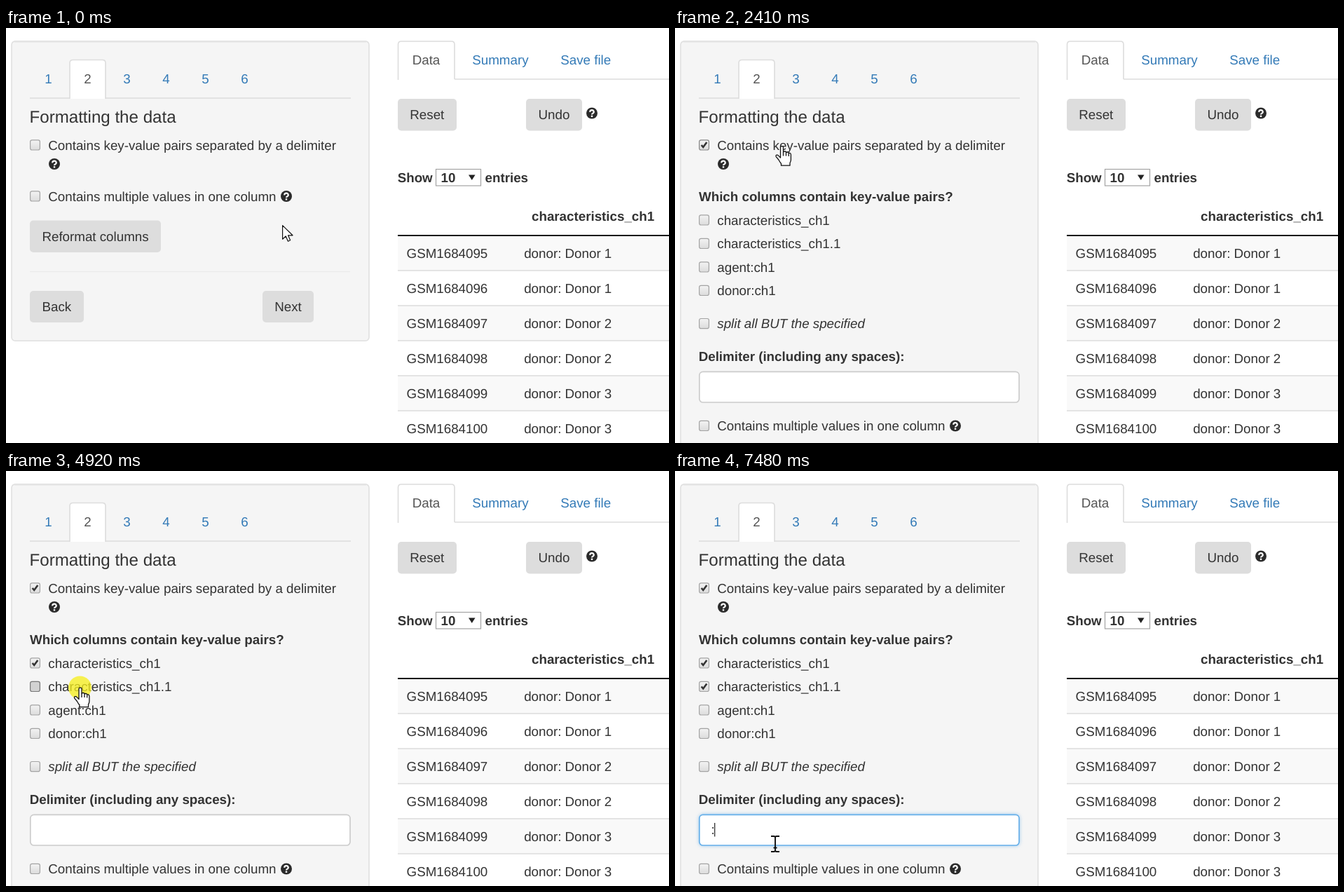
An HTML page that plays this animation: 946x592 px, repeating every 8 s.

```html
<!DOCTYPE html>
<html lang="en">
<head>
<meta charset="utf-8">
<title>Formatting the data</title>
<style>
html, body { margin: 0; width: 100%; height: 100%; overflow: hidden; background: #fff; }
svg { display: block; }
text {
  font: 18.76px "Liberation Sans", Arial, sans-serif;
  fill: #333; white-space: pre; text-rendering: geometricPrecision;
}
.bold { font-weight: bold; }
.italic { font-style: italic; }
.title { font-size: 24.12px; }
.link { fill: #337ab7; }
.idle { fill: #555; }
.mid text, text.mid { text-anchor: middle; }
.button { fill: #ddd; }
.line { fill: none; stroke: #ddd; stroke-width: 1.6; }
.tab { fill: #fff; stroke: #ddd; stroke-width: 1.6; }
.box { fill: url(#face); stroke: #a3a3a3; stroke-width: 1.2; }
.hot .box { stroke: #858585; }
.down .box { fill: #d2d2d2; stroke: #777; }
.tick { fill: none; stroke: #333; stroke-width: 2.6; visibility: hidden; }
.on .tick { visibility: visible; }
#field { fill: #fff; stroke-width: 1.7; }
#spot { fill: #f7f01d; opacity: .76; }
.cursor { stroke-linejoin: round; }
</style>
</head>
<body>
<svg id="stage" width="946" height="592" viewBox="0 0 946 592">
  <defs>
    <linearGradient id="face" x2="0" y2="1">
      <stop stop-color="#f3f3f3"/><stop offset="1" stop-color="#dcdcdc"/>
    </linearGradient>
    <g id="help">
      <circle r="8" fill="#2b2b2b"/>
      <path d="M-2.7-1.7A2.7 2.5 0 1 1 1.3.3Q0 .9 0 2.1" fill="none" stroke="#fff" stroke-width="2.2"/>
      <path d="M-1.2 3.2h2.4v2.3h-2.4z" fill="#fff"/>
    </g>
  </defs>
  <rect width="946" height="592" fill="#fff"/>

  <rect id="well" x="8" y="18.9" width="510" height="427.3" rx="5" fill="#f5f5f5" stroke="#e0e0e0" stroke-width="1.6"/>
  <path d="M12 20.4H514" stroke="#ebebeb" stroke-width="1.4"/>
  <path class="line" d="M34 100H492"/>
  <path class="tab" d="M91 101V50Q91 45.5 95.500 45.500H137.500Q142 45.500 142 50V101" stroke-linejoin="round"/>
  <g id="steps" class="mid"></g>
  <text class="title" x="33.500" y="135">Formatting the data</text>
  <use href="#help" x="69" y="194"/>

  <g id="short">
    <rect class="button" x="34" y="274.500" width="187" height="45.500" rx="5"/>
    <text class="mid" x="127.500" y="303.500">Reformat columns</text>
    <path d="M34 347.500H491" stroke="#ebebeb" stroke-width="1.4"/>
    <rect class="button" x="34" y="375" width="77" height="45" rx="5"/>
    <text class="mid" x="72.300" y="404">Back</text>
    <rect class="button" x="366" y="375" width="73" height="45" rx="5"/>
    <text class="mid" x="402.500" y="404">Next</text>
  </g>

  <g id="long">
    <text class="bold" x="34" y="247">Which columns contain key-value pairs?</text>
    <text class="bold" x="33.700" y="475">Delimiter (including any spaces):</text>
    <rect id="field" x="34.800" y="490.300" width="456.200" height="43.700" rx="5"/>
    <text id="typed" x="51.500" y="518">:</text>
    <rect id="caret" y="502" width="1.300" height="19.500" fill="#333"/>
  </g>
  <g id="checks"></g>
  <use id="tip" href="#help" x="400"/>

  <path class="line" d="M640 73H946"/>
  <path class="tab" d="M559.500 74V23.500Q559.500 19 564 19H635.500Q640 19 640 23.500V73"/>
  <text class="idle" x="579.700" y="52">Data</text>
  <text class="link" x="665.300" y="52">Summary</text>
  <text class="link" x="791.300" y="52">Save file</text>
  <rect class="button" x="559" y="101" width="84" height="45.500" rx="5"/>
  <text class="mid" x="600.800" y="130">Reset</text>
  <rect class="button" x="742" y="101" width="80" height="45.500" rx="5"/>
  <text class="mid" x="782" y="130">Undo</text>
  <use href="#help" x="836" y="121.500"/>
  <text class="bold" x="558.700" y="220">Show</text>
  <rect x="613.500" y="201.500" width="64" height="23.500" fill="#fff" stroke="#a3a3a3" stroke-width="1.200"/>
  <text class="bold" x="620.500" y="220">10</text>
  <path d="M660 209.500h9.500l-4.750 7.500z" fill="#222"/>
  <text class="bold" x="683.500" y="220">entries</text>
  <text class="bold" x="750" y="274.500">characteristics_ch1</text>
  <g id="table"></g>
  <path d="M559 296H946" stroke="#151515" stroke-width="1.800"/>

  <circle id="spot" r="16.500"/>
  <g id="pointer">
    <path id="arrow" class="cursor" fill="#fff" stroke="#111" stroke-width="1.200"
      d="M.6.6V20.200L5.200 16 8.400 23.200 11.600 21.800 8.500 14.800H15Z"/>
    <g id="hand" class="cursor" fill="#fff" stroke="#111" stroke-width="1.300">
      <path d="M-2 2.400Q-2 .6 0 .6T2 2.400V9Q2.200 7.900 4.200 8T6 9.800Q6.400 8.900 8 9T9.700 10.800Q10.200 10.200 11.400 10.400T12.900 12.600V20Q12.900 22 11.500 24.500V28.200H-1V25.500Q-3 23-4.600 20L-8.300 15.600Q-9 13.800-7.400 13.200-6 12.900-4.600 14.400L-2 17Z"/>
      <path d="M2 9V14.500M6 10V14.500M9.700 11V15"/>
    </g>
    <path id="beam" fill="none" stroke="#111" stroke-width="1.900"
      d="M-6-11H-2Q0-11 0-9 0-11 2-11H6M0-9V9M-6 11H-2Q0 11 0 9 0 11 2 11H6M-2.500 5.500H2.500"/>
  </g>
</svg>
<script>
const LOOP = 8000, TICK = 77.9;
const $ = id => document.getElementById(id);

function add(parent, tag, attrs, text = "") {
  const el = document.createElementNS("http://www.w3.org/2000/svg", tag);
  for (const k in attrs) el.setAttribute(k, attrs[k]);
  el.textContent = text;
  return parent.appendChild(el);
}
const show = (id, on) => $(id).style.display = on ? "" : "none";

for (let i = 0; i < 6; i++)
  add($("steps"), "text", { x: 60.5 + 56 * i, y: 79, class: i === 1 ? "idle" : "link" }, i + 1);

for (let i = 0; i < 6; i++) {
  const top = 296 + 50 * i, table = $("table");
  if (i % 2 === 0) add(table, "rect", { x: 559, y: top, width: 387, height: 50, fill: "#f9f9f9" });
  if (i) add(table, "path", { class: "line", d: `M559 ${top}H946` });
  add(table, "text", { x: 571.6, y: top + 31.5 }, "GSM" + (1684095 + i));
  add(table, "text", { x: 739.2, y: top + 31.5 }, "donor: Donor " + (1 + (i >> 1)));
}

// Each checkbox: centre line, label, reach of its label below that line.
function checkbox(y, label, style = "", reach = 13.4) {
  const g = add($("checks"), "g", {});
  add(g, "rect", { class: "box", x: 34.6, y: -7.2, width: 13.8, height: 14.2, rx: 2.5 });
  add(g, "path", { class: "tick", d: "M37.700 0L40.200 3 45.300-4" });
  add(g, "text", { x: 60.3, y: 6.5, class: style }, label);
  return { g, y, reach };
}
const pairs = checkbox(167, "Contains key-value pairs separated by a delimiter", "", 40);
const columns = ["characteristics_ch1", "characteristics_ch1.1", "agent:ch1", "donor:ch1"]
  .map((name, i) => checkbox(274 + 33.5 * i, name));
const split = checkbox(421.7, "split all BUT the specified", "italic");
const multiple = checkbox(240, "Contains multiple values in one column");
const extra = [...columns, split], all = [pairs, ...extra, multiple];

// Pointer path: tick, x, y.
const path = [
  [0, 394, 281], [6, 394, 281], [14, 202, 206], [17, 178, 187], [22, 152.5, 168],
  [35, 152.5, 168], [40, 128.500, 218], [46, 111, 266], [50, 111, 266], [59, 106, 308.5],
  [64, 106, 308.5], [73, 132, 541], [75, 132, 541], [77, 143, 532], [103, 143, 532]
];
// Clicks: highlight on, pressed, released, centre.
const clicks = [
  [29, 30, 31, 152.5, 168, pairs], [48, 49, 51, 111.5, 266.5, columns[0]],
  [63, 63, 65, 105.5, 309, columns[1]], [82, 82, 84, 141, 530.5, null]
];

function slope(i, axis) {
  const a = path[i - 1], b = path[i], c = path[i + 1];
  if (!a || !c || a[axis] === b[axis] || b[axis] === c[axis]) return 0;
  return (c[axis] - a[axis]) / (c[0] - a[0]);
}
function along(n, axis) {
  const i = path.findIndex(p => p[0] > n) - 1;
  const a = path[i], b = path[i + 1], d = b[0] - a[0], u = (n - a[0]) / d;
  const s = u * u * (3 - 2 * u);
  return a[axis] + (b[axis] - a[axis]) * s
    + d * u * (1 - u) * (slope(i, axis) * (1 - u) - slope(i + 1, axis) * u);
}

function draw(t) {
  const n = Math.floor((t + 8) / TICK), open = n >= 31;
  const x = along(n, 1), y = along(n, 2);

  show("short", !open);
  show("long", open);
  $("well").setAttribute("height", open ? 640 : 427.3);
  multiple.y = open ? 567.5 : 240;
  $("tip").setAttribute("y", multiple.y);

  let hovered = null;
  for (const c of all) {
    const visible = open || !extra.includes(c);
    c.g.style.display = visible ? "" : "none";
    c.g.setAttribute("transform", `translate(0 ${c.y})`);
    if (visible && y > c.y - 13.4 && y < c.y + c.reach) hovered = c;
  }
  const click = clicks.find(c => n >= c[0] && n < c[2]);
  for (const c of all) {
    const own = clicks.find(k => k[5] === c);
    c.g.classList.toggle("on", !!own && n >= own[2]);
    c.g.classList.toggle("down", !!own && n >= own[1] && n < own[2]);
    c.g.classList.toggle("hot", c === hovered);
  }

  show("spot", click);
  if (click) $("spot").setAttribute("transform", `translate(${click[3]} ${click[4]})`);

  const focus = n < 82 ? 0 : [.4, .8][n - 82] || 1;
  const mix = [102, 175, 233].map(v => Math.round(204 + (v - 204) * focus));
  $("field").style.stroke = `rgb(${mix})`;
  $("field").style.filter = focus ? `drop-shadow(0 0 2.5px rgba(102,175,233,${.6 * focus}))` : "none";
  show("typed", n >= 96);
  show("caret", n >= 82 && n < 89 || n >= 96);
  $("caret").setAttribute("x", n >= 96 ? 56 : 51.8);

  const inField = open && y > 489 && y < 535;
  show("hand", hovered);
  show("beam", inField);
  show("arrow", !hovered && !inField);
  $("pointer").setAttribute("transform", `translate(${x} ${y})`);
}

const start = performance.now();
function frame() {
  draw((performance.now() - start) % LOOP);
  requestAnimationFrame(frame);
}
frame();
</script>
</body>
</html>
```
